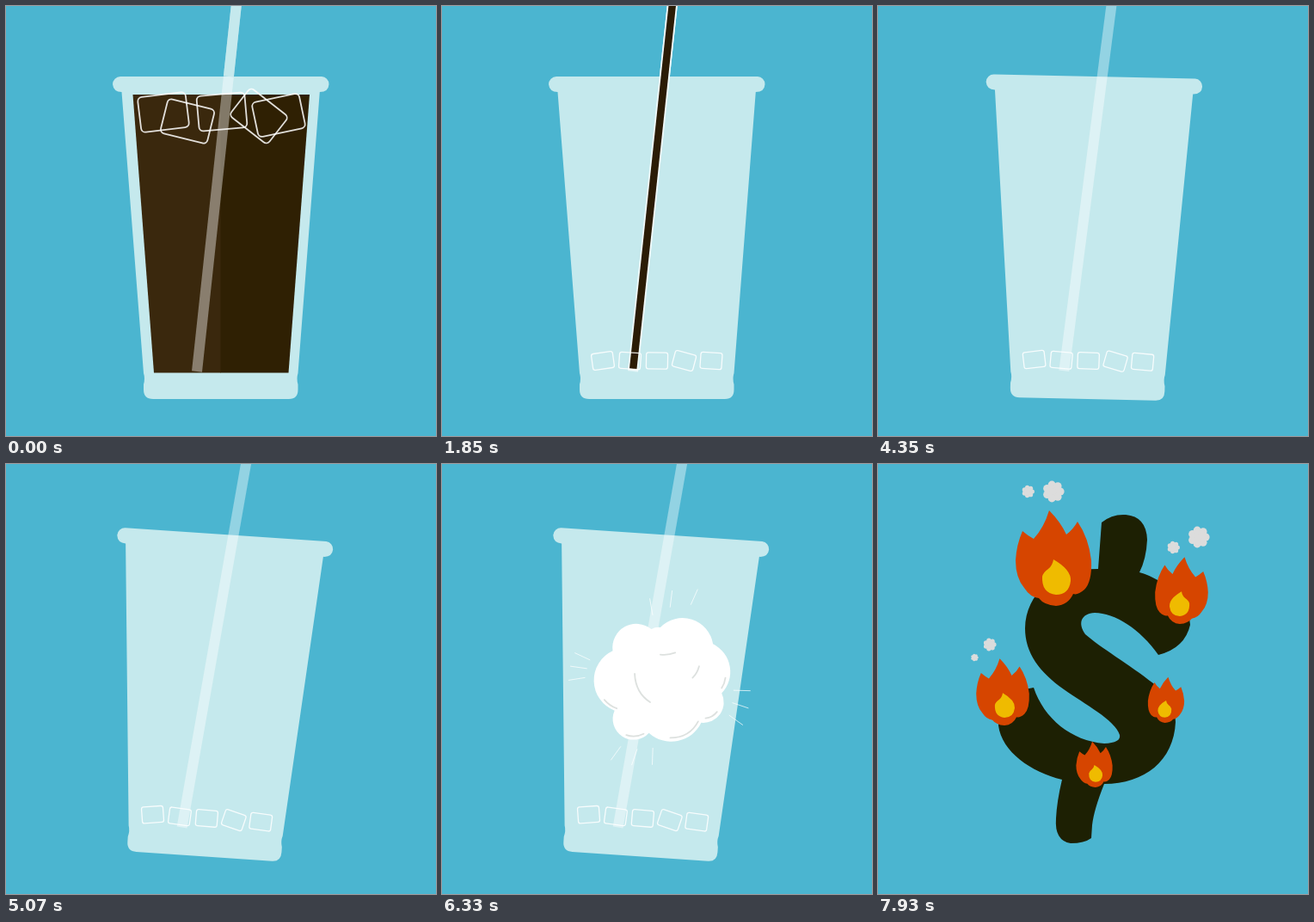
These frames come from a looping animation (500 px wide and 500 px high, 8 s). An HTML page:

```html
<!DOCTYPE html>
<html lang="en">
<head>
<meta charset="utf-8">
<title>Iced coffee</title>
<style>
html, body { margin: 0; width: 100%; height: 100%; overflow: hidden; background: #4bb5d0; }
svg { display: block; width: 100vw; height: 100vh; }
</style>
</head>
<body>
<svg viewBox="0 0 500 500">
  <defs>
    <clipPath id="levelClip"><rect id="level" x="100" width="300" height="400"/></clipPath>
    <clipPath id="sipClip"><rect id="sip" x="100" width="300"/></clipPath>
    <g id="flame">
      <path fill="#d64500" d="M207 165Q193 164 187 156Q177 155 170 144Q160 132 160 112Q161 94 168 78Q175 84 181 87Q193 74 199 54Q212 67 219 82Q227 76 232 67Q245 86 248 112Q249 137 240 146Q232 153 227 151Q221 164 207 165Z"/>
      <path fill="#efbb00" d="M204 111Q225 123 224 136Q222 152 207 152Q190 150 191 131Q192 126 198 122Q203 118 204 111Z"/>
    </g>
  </defs>
  <rect width="500" height="500" fill="#4bb5d0"/>

  <g id="cup">
    <path fill="#c5e9ed" d="M133 82H367A9 9 0 0 1 375.500 91Q375 100 364.800 100L339.500 427Q337.500 433 339.500 440V446Q339.500 457 329 457H171Q160 457 160 446V440Q162 433 160 427L134.500 100Q125 100 124 91A9 9 0 0 1 133 82Z"/>
    <g id="drink" clip-path="url(#levelClip)">
      <path fill="#3a280d" d="M147.500 103H250V426.500H172Z"/>
      <path fill="#2f2003" d="M249.500 103H353L328.500 426.500H249.500Z"/>
    </g>
    <path stroke="#fff" stroke-opacity=".4" stroke-width="12" d="M272 -40L222 425"/>
    <path id="cap" stroke="#c5e9ed" stroke-width="12" d="M272 -40L258.900 82"/>
    <g id="column" clip-path="url(#sipClip)">
      <path stroke="#f0fafb" stroke-width="12" d="M272 -40L222 424"/>
      <path stroke="#2b1c06" stroke-width="8.500" d="M272 -40L222.200 422"/>
    </g>
    <g id="cubes" fill="none" stroke="#fff" stroke-opacity=".85"></g>
  </g>

  <g id="poof">
    <g id="rays" stroke="#fff" stroke-width="2"></g>
    <path fill="#fff" d="M98 159A77 77 0 0 1 223 89A47 47 0 0 1 252 83A100 100 0 0 1 422 137A100 100 0 0 1 450 296A66 66 0 0 1 384 391A107 107 0 0 1 215 424A67 67 0 0 1 104 352A105 105 0 0 1 98 159Z"/>
    <path fill="none" stroke="#dde1df" stroke-width="5" stroke-linecap="round" d="M252 171Q277 174 300 165M377 209Q371 232 356 246M169 233Q172 295 219 325M462 246Q460 264 450 279M71 317Q88 337 111 345M142 431Q170 441 198 427M284 440Q346 440 374 387M398 377Q420 375 435 356"/>
  </g>

  <g id="money">
    <path fill="#1d2003" d="M260 68Q272 58 288 59Q312 61 313 88Q312 110 304 126C335 135 362 160 363 187Q357 214 326 222C305 192 275 173 252 173C236 174 232 185 241 198C258 213 292 233 320 255Q346 276 346 300C344 345 310 372 263 372Q251 402 249 420L248 435Q240 441 224 441Q205 438 207 412Q208 392 214 367C178 358 144 335 140 304Q142 285 152 270Q165 262 181 260C193 296 225 322 263 325Q283 324 281 315C276 298 240 279 216 262C188 242 171 220 171 191C172 150 205 122 256 122Z"/>
    <g id="flames"></g>
    <g id="smoke" fill="#dcdcdc"></g>
  </g>
</svg>
<script>
const LOOP = 8000;
const $ = id => document.getElementById(id);
const show = (id, on) => { $(id).style.display = on ? "" : "none"; };
const mix = (a, b, p) => a + (b - a) * p;

function set(el, attrs) {
  for (const key in attrs) el.setAttribute(key, attrs[key]);
}
function add(parent, tag, attrs = {}) {
  const el = document.createElementNS("http://www.w3.org/2000/svg", tag);
  set(el, attrs);
  return $(parent).appendChild(el);
}
// Point at a distance and angle (degrees) from x, y
function polar(x, y, r, deg) {
  const a = deg * Math.PI / 180;
  return [x + r * Math.cos(a), y + r * Math.sin(a)];
}
// How many of n evenly spaced steps have begun
const steps = (t, start, gap, n) =>
  Math.max(0, Math.min(n, Math.floor((t - start) / gap) + 1));

// Ice cubes: floating x, y, angle, then angle once melted
const cubes = [
  [183, 123.5, -7, -8], [211, 134, 14, 4], [251, 123, -5, 1], [294, 128, 38, 15], [317, 127, -12, 4]
].map(spec => ({ spec, el: add("cubes", "rect") }));

// Fans of three rays: angle, distance, change of distance across the fan
for (const [angle, dist, slope] of [[-83, 233, 25], [188, 242, -4], [18.5, 242, 6], [109, 239, 15]])
  for (const k of [-1, 0, 1]) {
    const [x1, y1] = polar(255, 250, dist + k * slope, angle + k * 8 * (1 + slope / 30));
    const [x2, y2] = polar(x1, y1, 55, angle + k * 17);
    add("rays", "line", { x1, y1, x2, y2 });
  }

// Flames: x, bottom, scale, direction
const flames = [
  [204, 165, 1, 1], [353, 186, .7, -1], [145, 304, .7, 1], [335, 301, .48, -1], [251.5, 376, .48, 1]
].map(spec => ({ spec, el: add("flames", "use", { href: "#flame" }) }));

function puff(x, y, r) {
  add("smoke", "circle", { cx: x, cy: y, r: r * .75 });
  for (let i = 0; i < 7; i++) {
    const [cx, cy] = polar(x, y, r * .65, i * 360 / 7);
    add("smoke", "circle", { cx, cy, r: r * .36 });
  }
}
// Each large puff has a small one to its left
for (const [x, y, r, drop] of [[204, 32, 12.5, 0], [373, 85, 12.5, 12], [130, 210, 7.5, 15]]) {
  puff(x, y, r);
  puff(x - r * 2.35, y + drop, r * .58);
}

function drawDrink(t) {
  const p = (steps(t, 1000, 1, 1) + steps(t, 1200, 81.25, 9)) / 10;
  set($("level"), { y: mix(101, 427, p) });
  show("drink", p < 1);

  const w = mix(56, 25, p), h = mix(41, 19, p);
  cubes.forEach(({ spec: [x, y, angle, rest], el }, i) => set(el, {
    x: -w / 2, y: -h / 2, width: w, height: h, rx: mix(5, 2.5, p),
    "stroke-width": mix(1.8, 1.3, p),
    transform: `translate(${mix(x, 187 + i * 31.5, p)} ${mix(y, 412.5, p)}) rotate(${mix(angle, rest, p)})`
  }));
}

function drawStraw(t) {
  const top = mix(430, -50, steps(t, 100, 100, 3) / 3);
  const end = mix(430, -50, steps(t, 2550, 100, 4) / 4);
  set($("sip"), { y: top, height: Math.max(0, end - top) });
  show("column", end > top);
  show("cap", t < 2550);
}

function drawShake(t) {
  const n = steps(t, 4350, 180, 6) + steps(t, 5430, 100, 9);
  const size = n > 4 ? 4 : 1.4;
  const angle = n && (n % 2 ? size : -size) - .15;
  set($("cup"), { transform: `rotate(${angle} 250 165)` });
}

function drawPoof(t) {
  const n = steps(t, 6330, 100, 5);
  const size = 1 - (1 - n / 5) ** 2;
  show("cup", n < 3);
  show("poof", n > 0 && t < 7530);
  set($("poof"), { transform: `translate(255 250) scale(${size}) translate(-255 -250)` });
}

function drawMoney(t) {
  const n = steps(t, 7530, 200, 3);
  show("money", n > 0);
  show("flames", n > 1);
  show("smoke", n > 2);
  const turn = n > 2 ? 1 : -1;
  for (const { spec: [x, y, s, dir], el } of flames)
    set(el, { transform: `translate(${x} ${y}) scale(${s * dir * turn} ${s}) translate(-204 -165)` });
}

const began = performance.now();
function tick() {
  const t = (performance.now() - began) % LOOP;
  for (const draw of [drawDrink, drawStraw, drawShake, drawPoof, drawMoney]) draw(t);
  requestAnimationFrame(tick);
}
tick();
</script>
</body>
</html>
```
